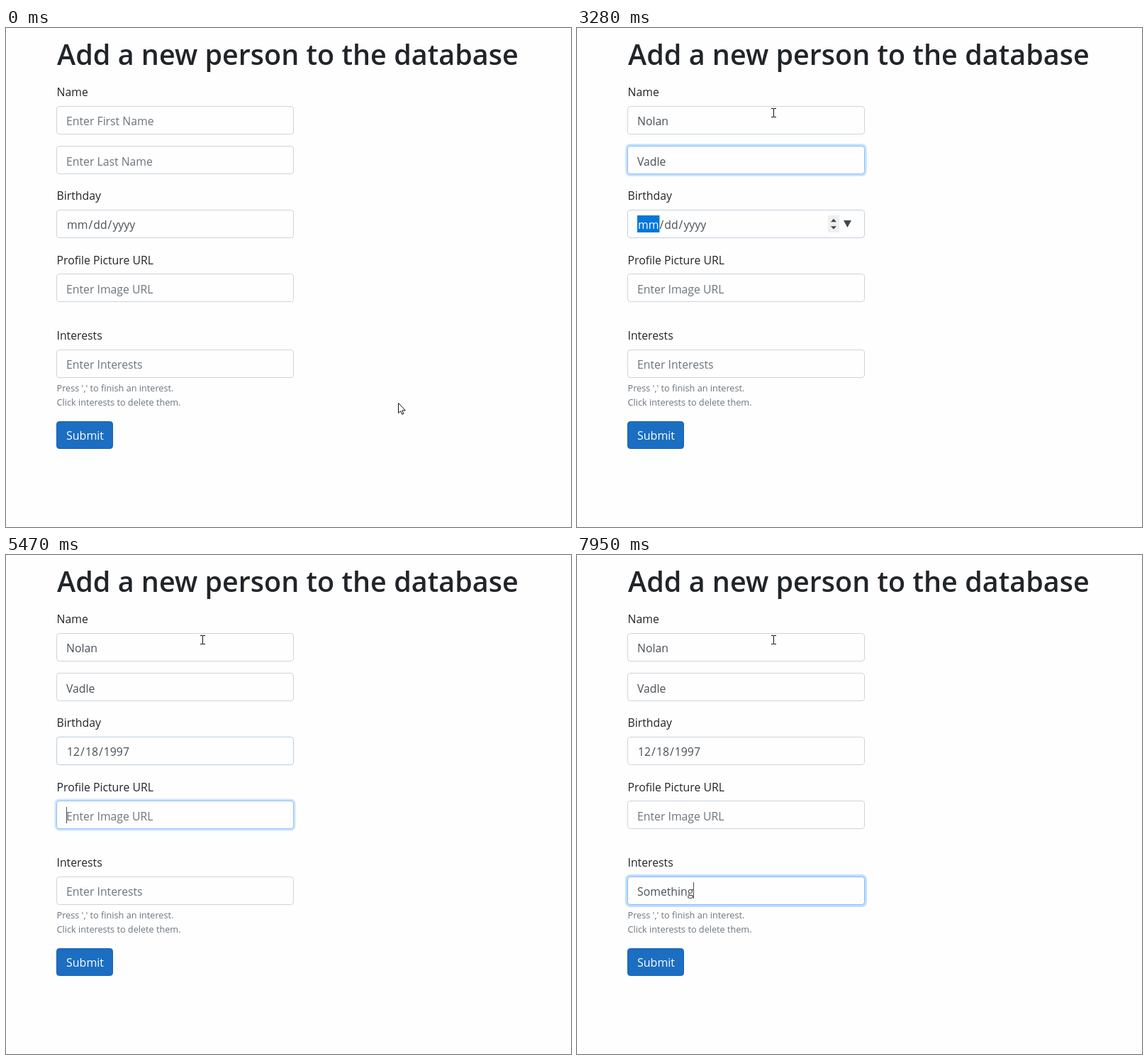
An HTML page for the animation above (8000 ms loop, 797 by 703 pixels).

```html
<!DOCTYPE html>
<html lang="en">
<head>
<meta charset="utf-8">
<title>Add a new person</title>
<style>
  html, body { margin: 0; width: 100%; height: 100%; overflow: hidden; background: #fefefe; }
  svg { display: block; width: 797px; height: 703px; font: 15.8px "Open Sans", "Noto Sans", sans-serif; fill: #212529; }
  text { white-space: pre; }
  .title { font-size: 39.52px; font-weight: 600; }
  .help { font-size: 12.7px; fill: #6c757d; }
  .value { fill: #495057; }
  .value.empty { fill: #6c757d; }
  .value .on { fill: #fff; }
  .ring { fill: #007bff; }
  .box { fill: #fefefe; }
</style>
</head>
<body>
<svg id="stage" viewBox="0 0 797 703">
  <text class="title" x="72" y="52">Add a new person to the database</text>
  <text x="71.5" y="96">Name</text>
  <text x="71.5" y="242">Birthday</text>
  <text x="71.5" y="333">Profile Picture URL</text>
  <text x="71.5" y="439">Interests</text>
  <text class="help" x="71.5" y="512">Press ',' to finish an interest.</text>
  <text class="help" x="71.5" y="532">Click interests to delete them.</text>
  <rect x="71.5" y="554.5" width="79" height="38" rx="3.7" fill="#1b6ec2" stroke="#1861ac"/>
  <text x="85" y="580" font-size="16" fill="#fff">Submit</text>
  <g id="fields"></g>
  <g id="picker">
    <rect x="354" y="264" width="16" height="24" fill="#efefef"/>
    <path d="M358 273.2 362 268.8 366 273.2ZM358 279.2 362 283.6 366 279.2Z" fill="#454545"/>
    <path d="M376 271H387L381.5 281Z" fill="#3f484f"/>
  </g>
  <rect id="caret" width="1" height="23" fill="#495057"/>
  <path id="arrow" d="M.5.5V14.6L3.7 11.6 5.8 16.3 7.9 15.4 5.8 10.8H10.4Z" fill="#fff" stroke="#111" stroke-width="1"/>
  <path id="beam" d="M-3.5 -6H-.5M.5 -6H3.5M0 -6V6M-3.5 6H-.5M.5 6H3.5" fill="none" stroke="#111"/>
</svg>
<script>
const LOOP = 8000, FADE = 150, LEFT = 85, HEIGHT = 40, SPREAD = 3;
const $ = id => document.getElementById(id);

// y: box top; base: text baseline; caret: caret top; focus: moment it gains focus; keys: key presses
const fields = [
  { y: 110, base: 137, caret: 118, focus: 860, hint: 'Enter First Name',
    text: 'Nolan', keys: [1450, 1590, 1670, 1760, 1840] },
  { y: 166, base: 194, caret: 175, focus: 2045, hint: 'Enter Last Name',
    text: 'Vadle', keys: [2520, 2710, 2770, 2910, 3090] },
  { y: 256, base: 283, focus: 3250, date: true },
  { y: 346, base: 374, caret: 355, focus: 5365, hint: 'Enter Image URL', text: '', keys: [] },
  { y: 453, base: 480, caret: 461, focus: 6010, hint: 'Enter Interests',
    text: 'Something', keys: [6610, 6690, 6770, 7320, 7520, 7570, 7770, 7810, 7950] },
];

// time, month, day, year, selected part
const dates = [
  [0, 'mm', 'dd', 'yyyy', 0],
  [3640, '01', 'dd', 'yyyy', 0],
  [3780, '12', 'dd', 'yyyy', 1],
  [4270, '12', '01', 'yyyy', 1],
  [4390, '12', '18', 'yyyy', 2],
  [4640, '12', '18', '0001', 2],
  [4710, '12', '18', '0019', 2],
  [4900, '12', '18', '0199', 2],
  [5150, '12', '18', '1997', 2],
];

// time, x, y of the pointer
const pointer = [[70, 553, 528], [750, 277, 113], [820, 277, 119]];

function set(el, attrs) {
  for (const k in attrs) el.setAttribute(k, attrs[k]);
  return el;
}
function add(parent, tag, attrs) {
  const el = document.createElementNS('http://www.w3.org/2000/svg', tag);
  return parent.appendChild(set(el, attrs));
}
const show = (el, on) => el.setAttribute('visibility', on ? 'visible' : 'hidden');
const clamp = v => Math.min(1, Math.max(0, v));
const ease = v => v * v * (3 - 2 * v);
const mix = (a, b, k) => a + (b - a) * k;
const blend = (a, b, k) => `rgb(${a.map((v, i) => Math.round(mix(v, b[i], k)))})`;

fields.forEach((f, i) => {
  f.blur = i + 1 < fields.length ? fields[i + 1].focus : LOOP;
  f.ring = add($('fields'), 'rect', { class: 'ring' });
  f.box = add($('fields'), 'rect', { class: 'box', x: 71.5, y: f.y + .5, width: 334, height: HEIGHT - 1, rx: 3.7 });
  if (f.date) f.mark = add($('fields'), 'rect', { y: 264, height: 24, fill: '#0078d7' });
  f.label = add($('fields'), 'text', { class: 'value', x: f.date ? LEFT + 1 : LEFT, y: f.base });
  if (f.date) f.parts = [0, 1, 2, 3, 4].map(n => add(f.label, 'tspan', { dx: n ? 1 : 0 }));
});

function drawRing(f, t) {
  const k = ease(clamp((t - f.focus) / FADE)) * (1 - ease(clamp((t - f.blur) / FADE)));
  const s = SPREAD * k;
  set(f.ring, { x: 71 - s, y: f.y - s, width: 335 + 2 * s, height: HEIGHT + 2 * s, rx: 4.2 + s, opacity: .25 * k });
  f.box.setAttribute('stroke', blend([206, 212, 218], [128, 189, 255], k));
}

function drawDate(f, t, active) {
  const [, m, d, y, sel] = dates.filter(row => row[0] <= t).pop();
  [m, '/', d, '/', y].forEach((s, i) => {
    f.parts[i].textContent = s;
    f.parts[i].setAttribute('class', active && i === sel * 2 ? 'on' : '');
  });
  const start = [0, 3, 6][sel], end = start + [m, d, y][sel].length - 1;
  const x = f.label.getStartPositionOfChar(start).x - 1;
  set(f.mark, { x, width: f.label.getEndPositionOfChar(end).x + 1 - x });
  show(f.mark, active);
  show($('picker'), active);
}

function drawText(f, t, active) {
  const n = f.keys.filter(k => k <= t).length;
  f.label.textContent = n ? f.text.slice(0, n) : f.hint;
  f.label.setAttribute('class', n ? 'value' : 'value empty');
  if (!active) return;
  const last = n ? f.keys[n - 1] : f.focus + 30;
  const x = LEFT + (n ? f.label.getComputedTextLength() : 0);
  set($('caret'), { x: Math.round(x), y: f.caret });
  show($('caret'), t < last || (t - last) % 1000 < 500);
}

function drawPointer(t) {
  const [a, b, c] = pointer;
  const p = ease(clamp((t - a[0]) / (b[0] - a[0])));
  const q = ease(clamp((t - b[0]) / (c[0] - b[0])));
  const x = Math.round(mix(a[1], b[1], p));
  const y = Math.round(mix(a[2], b[2], p) + (c[2] - b[2]) * q);
  const over = fields.some(f => !f.date && x > 71 && x < 406 && y > f.y && y < f.y + HEIGHT);
  $('arrow').setAttribute('transform', `translate(${x} ${y})`);
  $('beam').setAttribute('transform', `translate(${x + .5} ${y + .5})`);
  show($('arrow'), !over);
  show($('beam'), over);
}

function draw(t) {
  show($('caret'), false);
  for (const f of fields) {
    const active = t >= f.focus && t < f.blur;
    drawRing(f, t);
    (f.date ? drawDate : drawText)(f, t, active);
  }
  drawPointer(t);
}

const begin = performance.now();
function tick() {
  draw((performance.now() - begin) % LOOP);
  requestAnimationFrame(tick);
}
tick();
</script>
</body>
</html>
```
